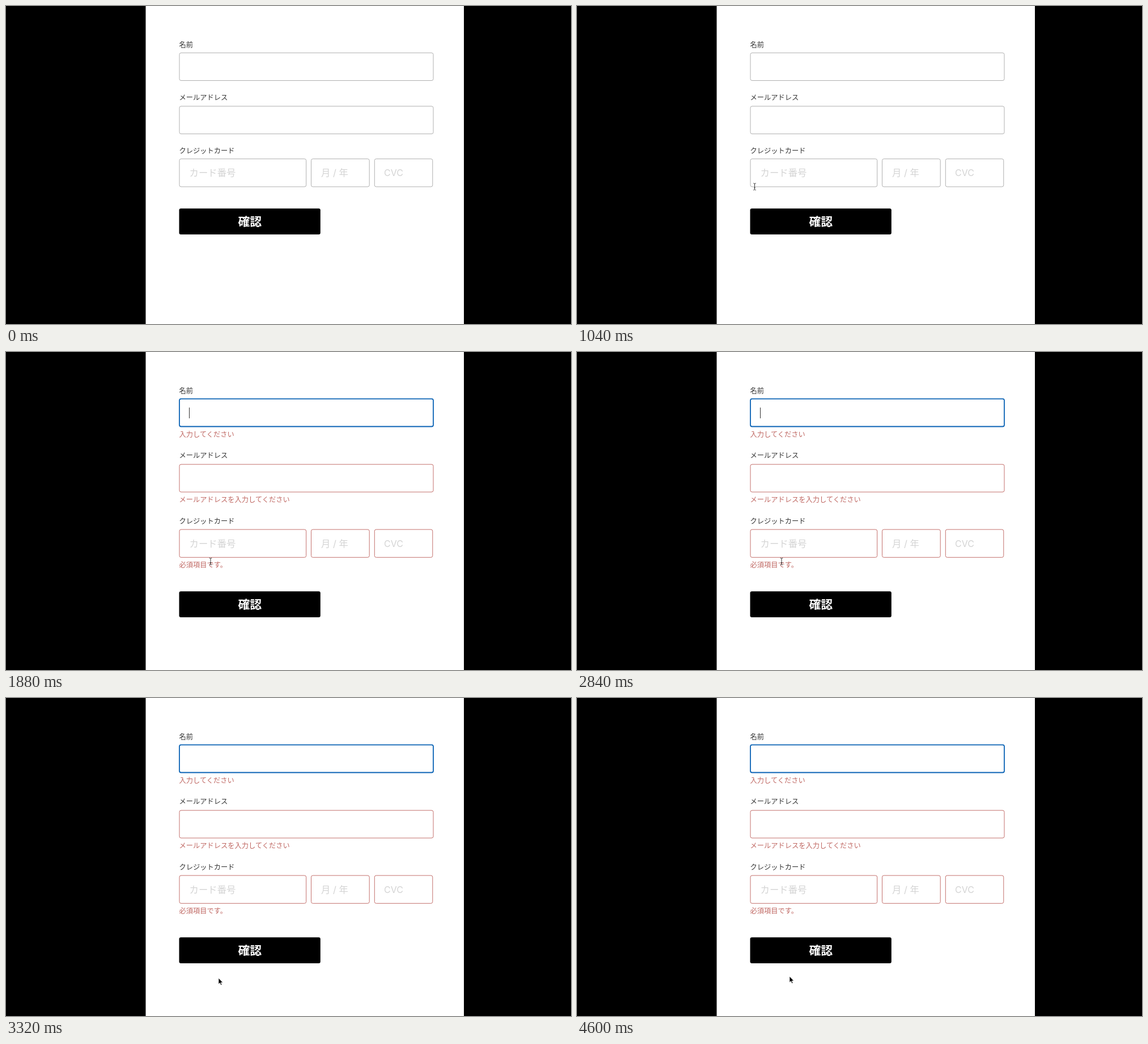
Recreate the animation shown at these times as an HTML page. Size 997 by 561 pixels, loop 5.08 s.

```html
<!DOCTYPE html>
<html lang="ja">
<head>
<meta charset="utf-8">
<title>Form validation</title>
<style>
  html, body { margin: 0; width: 100%; height: 100%; overflow: hidden; background: #000; }
  svg { display: block; width: 100vw; height: 100vh; }
  text { font-family: "Noto Sans CJK JP", "Noto Sans CJK", sans-serif; font-size: 12.25px; fill: #333; }
  .hint { font-family: Inter, "Noto Sans CJK JP", "Noto Sans CJK", sans-serif; font-size: 16.4px; fill: #d4d4d4; }
  .error { fill: #bf6661; }
  .submit { font-size: 20.8px; font-weight: 700; fill: #fff; text-anchor: middle; }
  .field { fill: #fff; stroke: #b0b0b0; }
  .invalid .field { stroke: #c4716d; }
  .invalid .focusable { stroke: #0b63b5; stroke-width: 1.8; }
  .error, .invalid .error { visibility: hidden; }
  .invalid .error { visibility: visible; }
</style>
</head>
<body>
<svg viewBox="0 0 997 561" preserveAspectRatio="none">
  <rect width="997" height="561" fill="#000"/>
  <rect x="246.5" width="561.5" height="561" fill="#fff"/>
  <g id="form">
    <g>
      <text x="305.5" y="73">名前</text>
      <rect class="field focusable" x="306" y="82.7" width="448" height="48.8" rx="3"/>
      <text class="error" x="305.5" y="149.5">入力してください</text>
    </g>
    <g id="email">
      <text x="305.5" y="166">メールアドレス</text>
      <rect class="field" x="306" y="176.8" width="448" height="48.8" rx="3"/>
      <text class="error" x="305.5" y="243.4">メールアドレスを入力してください</text>
    </g>
    <g id="card">
      <text x="305.5" y="259.7">クレジットカード</text>
      <rect class="field" x="306" y="269.7" width="223.7" height="49.2" rx="3"/>
      <rect class="field" x="538.5" y="269.7" width="102.7" height="49.2" rx="3"/>
      <rect class="field" x="650.3" y="269.7" width="102.5" height="49.2" rx="3"/>
      <text class="hint" x="323.5" y="300.2">カード番号</text>
      <text class="hint" x="556" y="300.2">月 / 年</text>
      <text class="hint" x="667" y="300.2" style="font-size:16px">CVC</text>
      <text class="error" x="305.5" y="336.5">必須項目です。</text>
    </g>
    <g id="button">
      <rect x="305.5" y="357.3" width="249.3" height="45.8" rx="3"/>
      <text class="submit" x="430.2" y="387.7">確認</text>
    </g>
    <rect id="caret" x="323" y="98" width="1" height="19" fill="#333"/>
  </g>
  <g id="cursor">
    <path id="arrow" d="M0 0V10.8L2.5 8.6L4.2 12.6L6 11.8L4.3 8H7.6Z" stroke="#fff" stroke-width=".7"/>
    <g id="hand">
      <path d="M-1.2 1Q-1-.3 0-.2Q1 0 1.2 1L1.7 4.4Q3.3 3.8 3.9 4.8Q5.4 4.3 6 5.4Q8 5 8 7V8.8L7 12H1.5Q.2 10-3 7.4Q-3.4 5.6-1.9 5.9L-.5 6.9Z" fill="#fff" stroke="#000" stroke-width=".7"/>
      <path d="M2.3 7.3V10M4.1 7.3V10M5.8 7.3V10" stroke="#000" stroke-width=".7"/>
    </g>
    <path id="beam" d="M-2.2-6Q-.2-6 0-4.8Q.2-6 2.2-6M0-5V5M-2.2 6Q-.2 6 0 4.8Q.2 6 2.2 6M-1.2 2H1.2" fill="none" stroke="#222" stroke-width=".9"/>
  </g>
</svg>
<script>
const LOOP = 5080, STEP = 40, SUBMIT = 1880;
const el = id => document.getElementById(id);
const show = (id, on) => el(id).setAttribute("visibility", on ? "visible" : "hidden");
const place = (id, x, y) => el(id).setAttribute("transform", `translate(${x} ${y})`);
const within = (v, a, b) => v >= a && v <= b;

// Eased progress between two times.
function ease(t, from, to) {
  const p = Math.min(1, Math.max(0, (t - from) / (to - from)));
  return p * p * (3 - 2 * p);
}

function pointerAt(t) {
  const enter = ease(t, 880, 1200);
  const leave = ease(t, 2920, 3240);
  const nudge = Math.min(3, Math.max(0, (t - 3640) / STEP));
  return [266 + 95 * enter + 14 * leave, 268 + 101.5 * enter + 124.5 * leave - nudge];
}

function cursorShape(x, y, invalid) {
  const shift = invalid ? 1 : 0;
  if (within(x, 306, 555) && within(y, 357 + 65 * shift, 403 + 65 * shift)) return "hand";
  const overField = within(x, 306, 530) && within(y, 269.7 + 43.4 * shift, 319 + 43.4 * shift);
  const overError = invalid && within(y, 365, 385);
  return overField || overError ? "beam" : "arrow";
}

function caretVisible(t) {
  return within(t, SUBMIT, 2359) || within(t, 2840, 3319) || within(t, 3800, 4239);
}

function render(time) {
  const t = Math.floor((time % LOOP) / STEP) * STEP;
  const invalid = t >= SUBMIT;
  el("form").setAttribute("class", invalid ? "invalid" : "");
  place("email", 0, invalid ? 21.4 : 0);
  place("card", 0, invalid ? 43.4 : 0);
  place("button", 0, invalid ? 64.9 : 0);
  show("caret", caretVisible(t));

  const [x, y] = pointerAt(t);
  const shape = cursorShape(x, y, invalid);
  place("cursor", x, y);
  for (const id of ["arrow", "hand", "beam"]) show(id, t >= 880 && id === shape);
}

const start = performance.now();
function tick() {
  render(performance.now() - start);
  requestAnimationFrame(tick);
}
tick();
</script>
</body>
</html>
```
